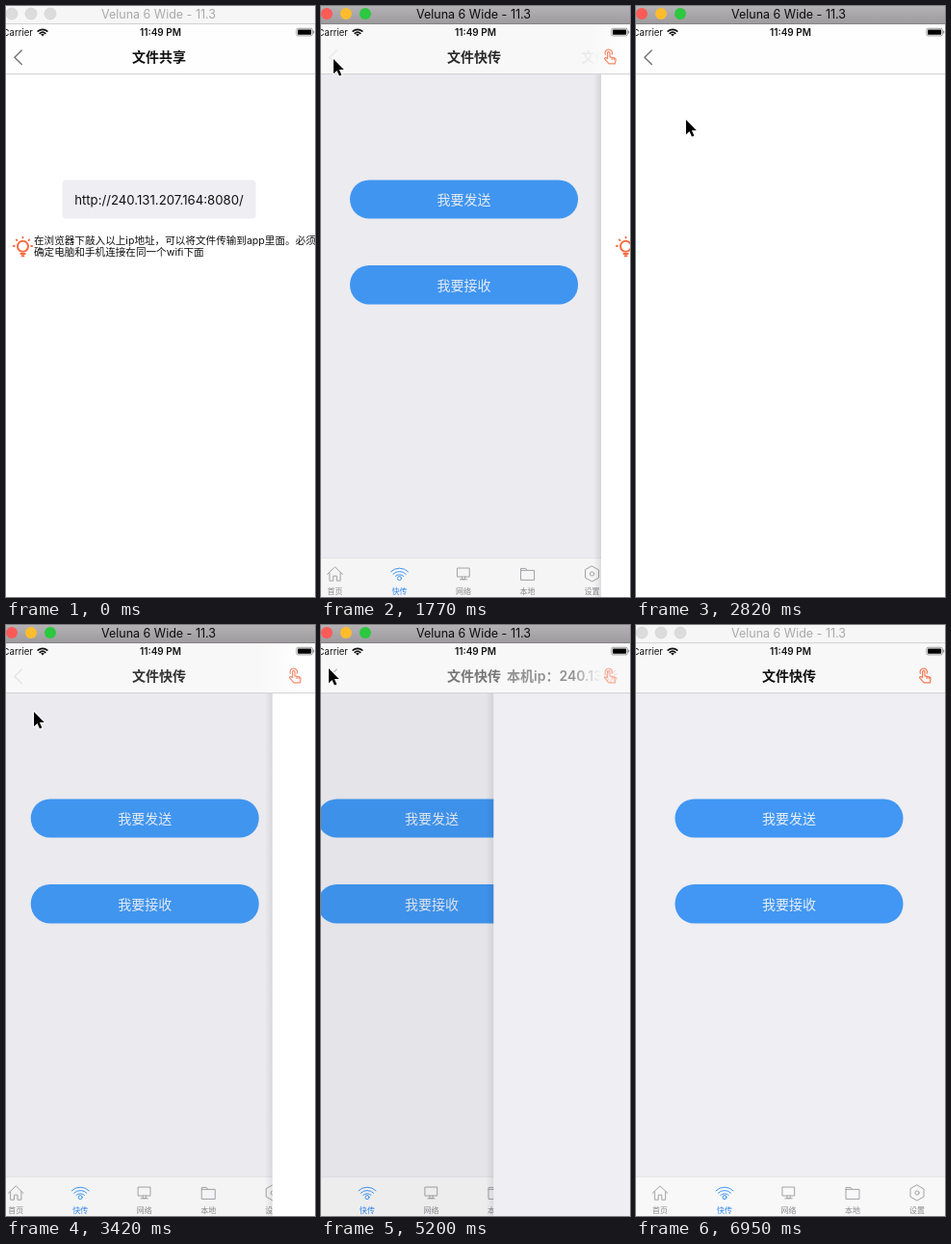
An HTML page that plays this animation: 321 px wide and 613 px high, repeating every 7.05 s.

```html
<!DOCTYPE html>
<html lang="zh-CN">
<head>
<meta charset="utf-8">
<title>文件快传</title>
<style>
  html, body { margin: 0; width: 100%; height: 100%; overflow: hidden; background: #fff; }
  svg { display: block; width: 321px; height: 613px; }
  text { font-family: Inter, "Noto Sans CJK SC", "Noto Sans CJK", sans-serif; }
  .mid { text-anchor: middle; }
  .title { font-size: 14px; font-weight: 600; fill: #111; }
  .hint { font-size: 10.6px; fill: #111; }
  .btn { font-size: 14px; fill: #e9eef5; }
  .line { fill: none; stroke-linecap: round; stroke-linejoin: round; }
  .tab { stroke: #a3a3a5; color: #8c8c8e; }
  .tab.on { stroke: #3f96f3; color: #3089ee; }
  .tab text { font-size: 8px; stroke: none; fill: currentColor; }
</style>
</head>
<body>
<svg viewBox="0 0 321 613">
  <defs>
    <linearGradient id="barOn" x2="0" y2="1">
      <stop stop-color="#b4b2b4"/><stop offset="1" stop-color="#9d9b9d"/>
    </linearGradient>
    <linearGradient id="shade">
      <stop stop-color="#000" stop-opacity="0"/><stop offset="1" stop-color="#000"/>
    </linearGradient>
    <linearGradient id="glow" gradientUnits="userSpaceOnUse" x1="-20" x2="20">
      <stop stop-color="#fefefe" stop-opacity="0"/><stop offset="1" stop-color="#fefefe"/>
    </linearGradient>
    <linearGradient id="fade" gradientUnits="userSpaceOnUse" x1="262" x2="291">
      <stop stop-color="#fff"/><stop offset="1" stop-color="#000"/>
    </linearGradient>
    <mask id="titleMask" maskUnits="userSpaceOnUse" x="0" y="30" width="321" height="40">
      <rect y="30" width="321" height="40" fill="url(#fade)"/>
    </mask>
  </defs>

  <!-- main page -->
  <g id="home">
    <rect x="-8" width="334" height="613" fill="#eeeef3"/>
    <g fill="#4197f3">
      <rect x="40.5" y="180.5" width="237" height="40" rx="20"/>
      <rect x="40.5" y="269" width="237" height="40.5" rx="20"/>
    </g>
    <text class="btn mid" x="159" y="206">我要发送</text>
    <text class="btn mid" x="159" y="294.5">我要接收</text>
    <rect x="-8" y="573" width="334" height="40" fill="#f8f8f9"/>
    <rect x="-8" y="572.5" width="334" height=".5" fill="#dcdcdf"/>
    <g id="tabs"></g>
  </g>
  <rect id="dim" y="70" width="321" height="543"/>

  <!-- page on top -->
  <g id="top">
    <rect id="shadow" x="-16" y="70" width="8" height="543" fill="url(#shade)"/>
    <rect id="sheet" x="-8" width="334" height="613"/>
    <g id="share">
      <rect x="58.5" y="180.5" width="201" height="40" rx="4" fill="#eeeef3"/>
      <text class="mid" x="159" y="206" font-size="13.2" fill="#111">http://240.131.207.164:8080/</text>
      <g class="line" stroke="#f66c43" stroke-width="2">
        <circle cx="17.5" cy="249.3" r="5.5"/>
        <path d="M15.4 256.9h4.2M16.6 259.2h1.8"/>
        <path d="M17.5 239.6v.8M10.8 242.4l.6.6M24.2 242.4l-.6.6M7.8 249h1M26.2 249h1" stroke-width="1.8"/>
      </g>
      <text class="hint" x="29" y="247">在浏览器下敲入以上ip地址，可以将文件传输到app里面。必须</text>
      <text class="hint" x="29" y="259">确定电脑和手机连接在同一个wifi下面</text>
    </g>
  </g>

  <!-- navigation bar -->
  <rect y="18" width="321" height="52" fill="#f8f8f9"/>
  <svg y="18" width="321" height="52"><rect id="navGlow" x="-20" width="400" height="52" fill="url(#glow)"/></svg>
  <rect y="70" width="321" height="1" fill="#d3d3d5"/>
  <path id="back" class="line" d="M16.3 46l-7.4 7.2 7.4 7.2" stroke="#747476" stroke-width="1.4"/>
  <text id="homeTitle" class="title mid" x="159" y="58">文件快传</text>
  <g mask="url(#titleMask)"><text id="topTitle" class="title" y="58"></text></g>
  <g id="hand" class="line" stroke="#f47a56" stroke-width="1.2">
    <path d="M297.6 54.6v-6a1.2 1.2 0 0 1 2.4 0v4.2l4.6 1a1.8 1.8 0 0 1 1.5 2l-.6 4h-6.4l-4.2-4.6c-.9-1.2.6-2 1.5-1.4z"/>
    <path d="M295.4 50.2a3.7 3.7 0 1 1 6.8 0M302.2 53.4v2M304.4 54v1.6"/>
  </g>
  <g id="spin" class="line" stroke="#ee9478" stroke-width="1.8"></g>

  <!-- status bar -->
  <text x="28" y="31" font-size="9.6" text-anchor="end" fill="#111">Carrier</text>
  <g class="line" stroke="#111" stroke-width="1.7">
    <path d="M33.2 26.2a7 7 0 0 1 9.6 0M35.2 28.4a4.2 4.2 0 0 1 5.6 0"/>
  </g>
  <path d="M38 31.6l-1.8-2a2.6 2.6 0 0 1 3.6 0z" fill="#111"/>
  <text class="mid" x="160.5" y="31" font-size="10" font-weight="600" fill="#111">11:49 PM</text>
  <rect x="301.8" y="23.3" width="16.6" height="7.6" rx="1.6" fill="#fff" stroke="#777" stroke-width=".7"/>
  <rect x="303" y="24.4" width="14.2" height="5.4" rx=".7"/>
  <rect x="319.2" y="25.6" width="1" height="3" rx=".5" fill="#777"/>

  <!-- window bar -->
  <rect id="bar" width="321" height="18"/>
  <rect id="barLine" y="18" width="321" height="1"/>
  <g id="lights"></g>
  <text id="winTitle" class="mid" x="158.5" y="13" font-size="12.5">Veluna 6 Wide - 11.3</text>

  <path id="cursor" d="M0 0v15.2l3.5-3.3 2.5 5.7 2.4-1-2.5-5.6h4.9z" stroke="#fff" stroke-width="2" stroke-linejoin="round" paint-order="stroke"/>
</svg>

<script>
const LOOP = 7050, W = 334;
const el = id => document.getElementById(id);
const set = (id, attrs) => {
  for (const k in attrs) el(id).setAttribute(k, attrs[k]);
};

// [first, last, count]: evenly spaced picture changes
const runs = [
  [600, 1630, 8], [1770, 2670, 7], [2820, 3720, 7], [3870, 4020, 2],
  [4320, 4460, 2], [4610, 5200, 5], [5340, 5640, 3], [5780, 5780, 1],
  [6080, 6380, 3], [6950, 6950, 1]
];
const ticks = [0];
for (const [a, b, n] of runs)
  for (let i = 0; i < n; i++)
    ticks.push(Math.round((a + (n > 1 ? (b - a) * i / (n - 1) : 0)) / 10) * 10);

const pages = {
  share: { title: '文件共享', left: 131, fill: '#fff', white: true },
  send: { title: '', left: 131, fill: '#fff', white: true },
  ip: { title: '本机ip：240.131.207.164', left: 80.5, fill: '#eeeef3', white: false }
};

// [start, page, pushed?, shadow strength]
const moves = [
  [-2000, 'share', true, .1], [1560, 'share', false, .1],
  [2352, 'send', true, .26], [3234, 'send', false, .08],
  [4180, 'ip', true, .08], [5097, 'ip', false, .08]
];

// [time, x, y]
const path = [
  [600, 312, 604], [1050, 190, 250], [1340, 42, 82], [1480, 15, 56], [1770, 13, 55],
  [2070, 68, 130], [2220, 100, 190], [2370, 101, 195], [2520, 100, 194], [2820, 52, 118],
  [3120, 10, 48], [3270, 12, 53], [3420, 29, 90], [3570, 62, 188], [3720, 88, 262],
  [3870, 92, 282], [4020, 94, 286], [4320, 68, 131], [4460, 30, 76], [4610, 12, 50],
  [4900, 9, 46], [5200, 8, 45], [5340, 14, 52], [5490, 120, 250], [5640, 258, 510],
  [5780, 307, 602], [6080, 309, 604], [6230, 314, 608], [6380, 323, 615]
];

const icons = [
  ['首页', 25, '<path d="M-8 0.5L0-7.2 8 .5M-5.6-1.4V7.2h3.8V2.2h3.6v5h3.8v-8.6"/>'],
  ['快传', 92, '<path d="M-9-2.2a12.6 12.6 0 0 1 18 0M-6.6.2a9.2 9.2 0 0 1 13.2 0M-4.2 2.4a6 6 0 0 1 8.4 0"/><circle cy="4.6" r="2"/>'],
  ['网络', 158.5, '<path d="M-6.2-6H6.2V3H-6.2zM-1.6 3v2.6h3.2V3M-3.6 5.8h7.2"/>'],
  ['本地', 225, '<path d="M-7 6V-5.6h5l1.6 2H7V6zM-7-3.6h6.6"/>'],
  ['设置', 292, '<path d="M0-8l7 4v8l-7 4-7-4v-8z"/><circle r="2.1"/>']
];
el('tabs').innerHTML = icons.map(([name, x, shape], i) =>
  `<g class="tab${i === 1 ? ' on' : ''}" transform="translate(${x} 589)">
     <g class="line">${shape}</g><text class="mid" y="21">${name}</text></g>`).join('');
el('spin').innerHTML = Array.from({ length: 10 }, (_, i) =>
  `<path d="M0-4v-2.8" opacity="${.5 + i * .05}" transform="translate(301 53) rotate(${i * 36})"/>`).join('');
el('lights').innerHTML = [6, 26, 46].map(x => `<circle cx="${x}" cy="8" r="6"/>`).join('');

// critically damped spring: share of the way still to go
const rest = ms => {
  const x = 18.26 * ms / 1000;
  return (1 + x) * Math.exp(-x);
};

function drawPages(t) {
  const [start, name, pushed, dark] = moves.filter(m => m[0] <= t).pop();
  const left = rest(t - start);
  const k = pushed ? left : 1 - left;
  const off = W * k, page = pages[name];
  set('home', { transform: `translate(${-.3 * (W - off)} 0)` });
  set('dim', { opacity: .1 * (1 - k) });
  set('top', { transform: `translate(${off} 0)`, visibility: k > .9995 ? 'hidden' : 'visible' });
  set('shadow', { opacity: dark });
  set('sheet', { fill: page.fill });
  set('share', { display: name === 'share' ? 'inline' : 'none' });
  set('navGlow', { transform: `translate(${off - 20 * (1 - k)} 0)`, opacity: page.white ? 1 : 0 });
  set('back', { opacity: 1 - k });
  set('homeTitle', { opacity: k });
  set('hand', { opacity: k });
  set('spin', { opacity: name === 'ip' ? .8 * (1 - k) : 0 });
  set('topTitle', { x: page.left + .827 * off - .001207 * off * off, opacity: 1 - k });
  el('topTitle').textContent = page.title;
}

function drawWindow(on) {
  set('bar', { fill: on ? 'url(#barOn)' : '#f6f6f6' });
  set('barLine', { fill: on ? '#858385' : '#d2d2d2' });
  set('winTitle', { fill: on ? '#0c0c0c' : '#a9a9a9' });
  const tones = on ? ['#fc5b57', '#fdbc2e', '#2bc840'] : ['#dcdcdc', '#dcdcdc', '#dcdcdc'];
  [...el('lights').children].forEach((c, i) => {
    c.setAttribute('fill', tones[i]);
    c.setAttribute('stroke', on ? 'none' : '#cfcfcf');
    c.setAttribute('stroke-width', .6);
  });
}

function drawCursor(t) {
  const i = path.findIndex(p => p[0] > t);
  const visible = i > 0;
  set('cursor', { visibility: visible ? 'visible' : 'hidden' });
  if (!visible) return;
  const [t0, x0, y0] = path[i - 1], [t1, x1, y1] = path[i];
  // the pointer rests on the button until the next page has begun to slide
  const f = t0 === 4020 ? 0 : (t - t0) / (t1 - t0);
  set('cursor', { transform: `translate(${x0 + (x1 - x0) * f} ${y0 + (y1 - y0) * f})` });
}

const begin = performance.now();
let shown = -1;
function loop() {
  const now = (performance.now() - begin) % LOOP;
  const t = ticks.filter(v => v <= now).pop();
  if (t !== shown) {
    shown = t;
    drawPages(t);
    drawWindow(t >= 600 && t < 6950);
    drawCursor(t);
  }
  requestAnimationFrame(loop);
}
loop();
</script>
</body>
</html>
```
